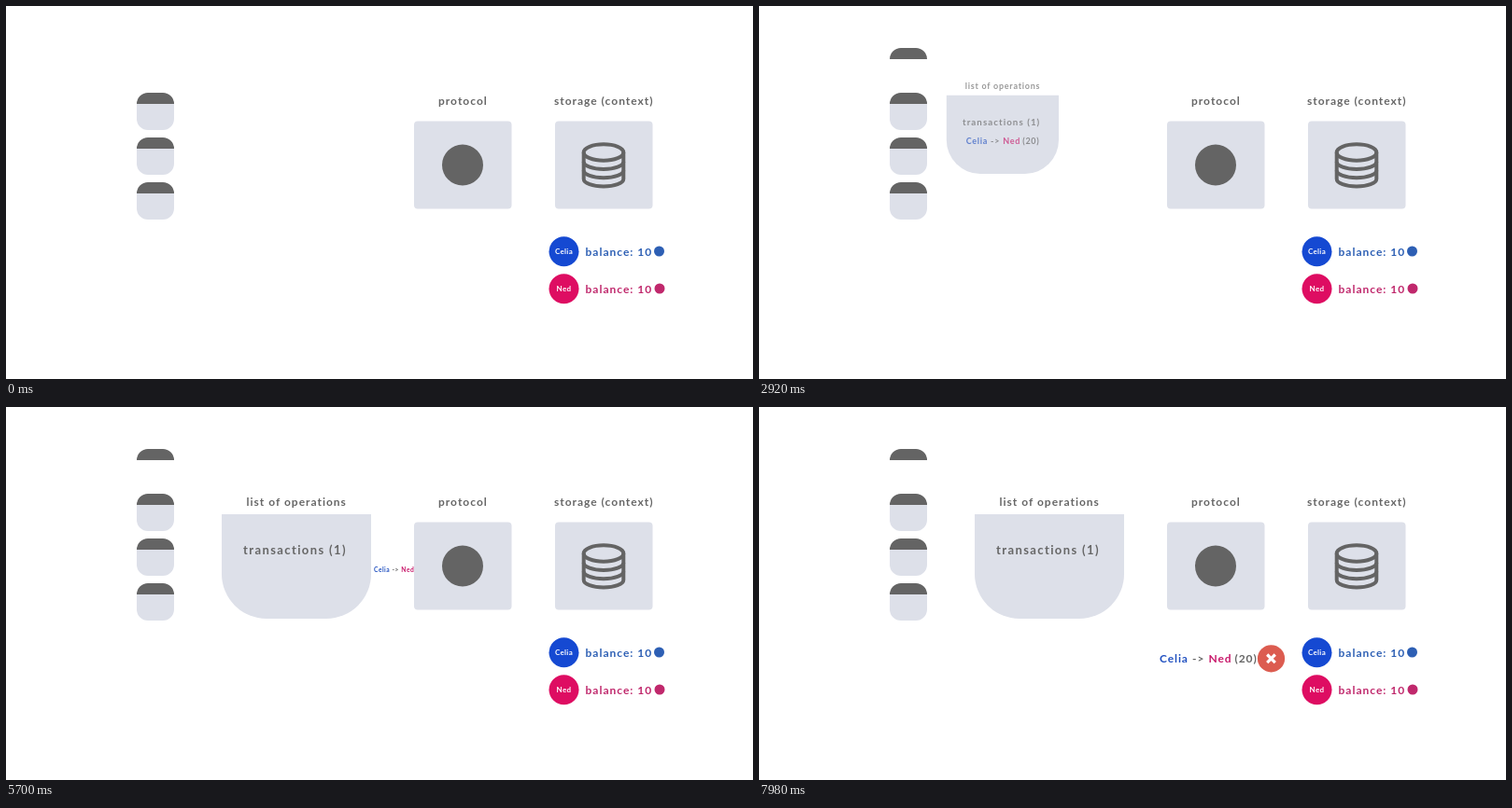
Write an HTML page that moves like this. It is 800 px wide and 400 px high and loops after 8000 ms.

```html
<!DOCTYPE html>
<html lang="en">
<head>
<meta charset="utf-8">
<title>Block validation</title>
<style>
  html, body { margin: 0; width: 100%; height: 100%; overflow: hidden; background: #fff; }
  svg { display: block; width: 100vw; height: 100vh; }
  text { font: 700 12px Lato, "Open Sans", sans-serif; letter-spacing: 1px; fill: #666; }
  .title { font-size: 13px; letter-spacing: 1.4px; }
  .tx text { letter-spacing: .9px; }
  .badge { font-size: 8px; letter-spacing: .3px; fill: #fff; text-anchor: middle; }
  .box { fill: #dde0e9; }
  .dark { fill: #646464; }
  .line { fill: none; stroke: #646464; stroke-width: 4; }
  .tx .a { fill: #2050c0; }
  .tx .b { fill: #c8186a; }
</style>
</head>
<body>
<svg viewBox="0 0 800 400">
  <defs>
    <path id="cap" class="dark" d="M0 12a12 12 0 0 1 12-12h16a12 12 0 0 1 12 12z"/>
    <g id="block">
      <use href="#cap"/>
      <path class="box" d="M0 12h40v16a12 12 0 0 1-12 12h-16a12 12 0 0 1-12-12z"/>
    </g>
  </defs>

  <g id="list">
    <path class="box" d="M231 115h160v64a48 48 0 0 1-48 48h-64a48 48 0 0 1-48-48z"/>
    <g id="labels">
      <text x="257.5" y="106">list of operations</text>
      <text class="title" x="254" y="158">transactions (1)</text>
    </g>
  </g>

  <g id="tx" class="tx">
    <text class="a" x="259" y="184">Celia</text>
    <text x="294" y="184">-&gt;</text>
    <text class="b" x="311.5" y="184">Ned</text>
    <text x="339.5" y="184">(20)</text>
  </g>

  <g id="head"><use href="#cap" x="140" y="45"/></g>
  <use href="#block" x="140" y="93"/>
  <use href="#block" x="140" y="141"/>
  <use href="#block" x="140" y="189"/>

  <text x="463" y="106">protocol</text>
  <rect class="box" x="437" y="123.5" width="104.5" height="94" rx="4"/>
  <circle class="dark" cx="489" cy="170.5" r="22"/>

  <text x="587" y="106">storage (context)</text>
  <rect class="box" x="588" y="123.5" width="104.5" height="94" rx="4"/>
  <g class="line">
    <ellipse cx="640" cy="157" rx="21.3" ry="8.8"/>
    <path d="M618.7 157v28.5a21.3 8 0 0 0 42.6 0v-28.5"/>
    <path d="M618.7 167a21.3 8 0 0 0 42.6 0M618.7 176.3a21.3 8 0 0 0 42.6 0"/>
  </g>

  <circle cx="597.5" cy="263.3" r="16" fill="#1549d2"/>
  <text class="badge" x="597.5" y="266.2">Celia</text>
  <text x="620.5" y="267.8" style="fill:#2d5fb4">balance: 10</text>
  <circle cx="699.5" cy="263" r="5.5" fill="#2d5fb4"/>

  <circle cx="597.5" cy="303.3" r="16" fill="#de0d62"/>
  <text class="badge" x="597.5" y="306.2">Ned</text>
  <text x="620.5" y="307.8" style="fill:#c0286c">balance: 10</text>
  <circle cx="700" cy="303" r="5.5" fill="#c0286c"/>

  <g id="cross">
    <circle r="14.6" fill="#dc5c50"/>
    <path d="M-4.3-4.3l8.6 8.6M4.3-4.3l-8.6 8.6" stroke="#fff" stroke-width="3.2"/>
  </g>
</svg>
<script>
const LOOP = 8000;
const el = id => document.getElementById(id);
const list = el('list'), labels = el('labels'), tx = el('tx'), head = el('head'), cross = el('cross');

const ramp = (t, from, to) => Math.min(1, Math.max(0, (t - from) / (to - from)));
const ease = p => (1 - Math.cos(Math.PI * p)) / 2;
const mix = (a, b, p) => a + (b - a) * p;
const place = (node, transform, opacity) => {
  node.setAttribute('transform', transform);
  node.setAttribute('opacity', opacity);
};
// Scale by s while carrying point (x0, y0) to (x, y).
const carry = (x0, y0, x, y, s) => `translate(${x} ${y}) scale(${s}) translate(${-x0} ${-y0})`;

function txPose(t) {
  const enter = ease(ramp(t, 5000, 6200));
  const leave = ease(ramp(t, 6200, 7400));
  if (leave > 0) {
    return carry(312, 180, mix(489, 482, leave), mix(171, 269.5, leave), mix(.3, 1, leave));
  }
  return carry(312, 180, mix(312, 489, enter), mix(180, 171, enter), mix(1, .3, enter));
}

function draw(t) {
  const drop = ramp(t, 20, 1220);
  const dropPose = carry(160, 92, 160, 92, mix(1.9, 1, drop));
  place(head, dropPose, drop);

  const grow = ease(ramp(t, 2190, 3390));
  const growPose = carry(231, 115, mix(140, 231, grow), mix(57, 115, grow), mix(.25, 1, grow));
  place(list, `${dropPose} ${growPose}`, drop);
  labels.setAttribute('opacity', grow);
  place(tx, grow < 1 ? growPose : txPose(t), grow);

  const pop = ease(ramp(t, 7420, 7860));
  place(cross, `translate(548.5 269.8) scale(${mix(1.5, 1, pop)})`, pop);
}

function tick() {
  draw(performance.now() % LOOP);
  requestAnimationFrame(tick);
}
tick();
</script>
</body>
</html>
```
